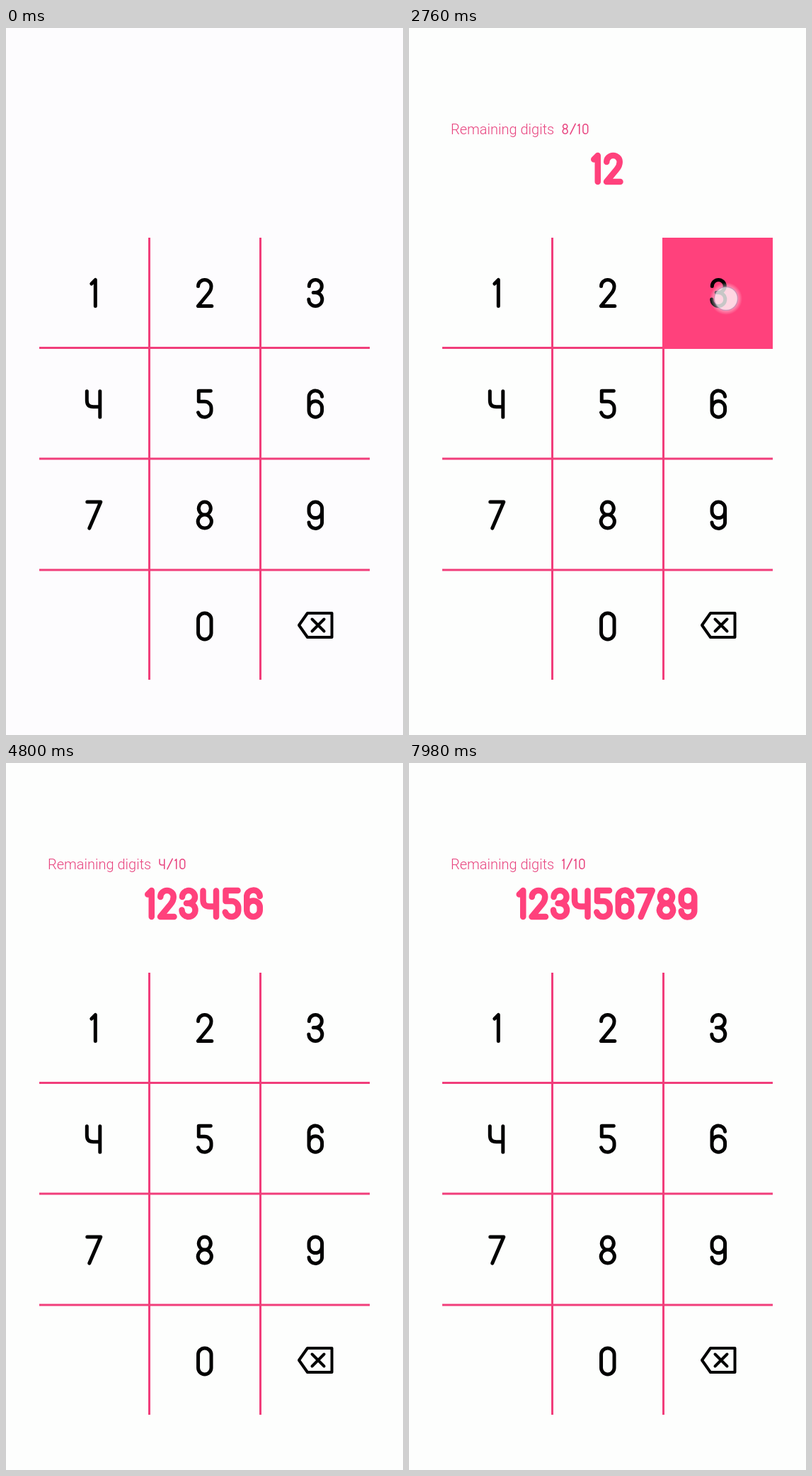
Write an HTML page that moves like this. It is 561x998 px and loops after 8000 ms.

```html
<!DOCTYPE html>
<html lang="en">
<head>
<meta charset="utf-8">
<title>Keypad</title>
<style>
  html, body { margin: 0; width: 100%; height: 100%; overflow: hidden; background: #fdfefd; }
  svg { display: block; width: 100vw; height: 100vh; }
  .glyph { fill: none; stroke-linecap: round; stroke-linejoin: round; }
  text { font: 300 20px Roboto, Lato, sans-serif; fill: #e8447f; }
</style>
</head>
<body>
<svg id="stage" viewBox="0 0 561 998">
  <defs>
    <radialGradient id="glow">
      <stop offset=".7" stop-color="#fff" stop-opacity=".45"/>
      <stop offset="1" stop-color="#fff" stop-opacity="0"/>
    </radialGradient>
  </defs>
  <rect id="back" width="561" height="998"/>
  <g id="label"><text x="59" y="150">Remaining digits</text><g id="count"></g></g>
  <g id="entry"></g>
  <path d="M202.5 296V920M359.5 296V920M47 451.5H514M47 608H514M47 765H514" stroke="#f13e7b" stroke-width="3"/>
  <rect id="cell" fill="#ff417c"/>
  <g id="keys"></g>
  <path class="glyph" d="M426 826H460.5V860H426L414 843ZM432.5 834.5L449.5 851.5M449.5 834.5L432.5 851.5" stroke="#000" stroke-width="4"/>
  <g id="touch">
    <circle r="23" fill="url(#glow)"/>
    <circle r="16.5" fill="#fff" fill-opacity=".6" stroke="#a878a8" stroke-opacity=".5" stroke-width="1.5"/>
  </g>
</svg>
<script>
const LOOP = 8000, STEP = 60, FADE = 180;
const $ = id => document.getElementById(id);

// Centre lines of the characters, around their middle
const GLYPHS = {
  0: 'M-9.25-9.25A9.25 9.25 0 0 1 9.25-9.25V9.25A9.25 9.25 0 0 1-9.25 9.25Z',
  1: 'M-3.5-13L2-18.5V18.5',
  2: 'M-9.25-9.5A9.25 9 0 0 1 9.25-9.5Q9.25-4 5 1L-9.5 18.5H10',
  3: 'M-9-9.5A9 9 0 1 1 0-.5H-3M0-.5A9.5 9.5 0 1 1-9.5 9',
  4: 'M-10-18V-5Q-10 4-1 4H8.5M8.5-18V18.5',
  5: 'M8.5-18.5H-8.5V-3.5H0A9.25 9.25 0 0 1 9.25 5.75V9.25A9.25 9.25 0 0 1 0 18.5Q-7 18.5-9.25 12',
  6: 'M9.25-10.5A9.25 9 0 0 0-9.25-9.25V9.25A9.25 9.25 0 0 0 9.25 9.25V5A9.25 9 0 0 0-9.25 5',
  7: 'M-9.5-18.5H9.5L-6.5 18.5',
  8: 'M0-.5A8.5 9 0 1 1 .01-.5ZM0-.5A9.5 9.5 0 1 0 .01-.5Z',
  9: 'M-9.25 10.5A9.25 9 0 0 0 9.25 9.25V-9.25A9.25 9.25 0 0 0-9.25-9.25V-5A9.25 9 0 0 0 9.25-5',
  '/': 'M-10 20L10-20'
};
const ADVANCE = { 1: 17, 7: 28, '/': 26 };
const advance = c => ADVANCE[c] || 30.5;

const glyph = (c, x, y, color, width, scale = 1) =>
  `<path class="glyph" d="${GLYPHS[c]}" transform="translate(${x} ${y}) scale(${scale})" stroke="${color}" stroke-width="${width}"/>`;

function line(text, x, y, color, width, scale = 1, gap = 0) {
  return [...text].map(c => {
    const w = advance(c) * scale + gap;
    x += w;
    return glyph(c, x - w / 2, y, color, width, scale);
  }).join('');
}

const COLS = [[47, 204], [201, 361], [358, 514]];
const ROWS = [[296, 453], [450, 609.5], [607, 766.5], [764, 920]];
const KEYS = '123456789 0<';

// key, finger down, touch gone, touch position
const PRESSES = [
  ['1', 1260, 1740, 133, 380],
  ['2', 2040, 2340, 299, 382],
  ['3', 2640, 3000, 448, 382],
  ['4', 3300, 3720, 133, 536],
  ['5', 3780, 4080, 285, 538],
  ['6', 4320, 4800, 446, 538],
  ['7', 5040, 5520, 131, 698],
  ['8', 5700, 6120, 291, 698],
  ['9', 6300, 6660, 446, 697],
  ['0', 7020, 7320, 285, 854],
  ['<', 7680, 7980, 455, 850]
].map(([key, down, end, x, y]) => ({ key, down, end, x, y, up: end - FADE }));

$('keys').innerHTML = [...KEYS].map((c, i) => GLYPHS[c]
  ? glyph(c, 124.3 + 156.5 * (i % 3), 374 + 156.8 * Math.floor(i / 3), '#000', 5)
  : '').join('');

function set(el, attrs) {
  for (const name in attrs) el.setAttribute(name, attrs[name]);
}

function showCell(key) {
  const i = KEYS.indexOf(key);
  const [x1, x2] = COLS[i % 3], [y1, y2] = ROWS[Math.floor(i / 3)];
  set($('cell'), { x: x1, y: y1, width: x2 - x1, height: y2 - y1 });
}

let shown = null;
function showEntry(digits) {
  if (digits === shown) return;
  shown = digits;
  const width = [...digits].reduce((sum, c) => sum + advance(c), 0);
  $('entry').innerHTML = line(digits, 280 - width / 2, 198.5, '#ff417c', 8.5);
  $('count').innerHTML = line(`${10 - digits.length}/10`, 214.8, 142.5, '#e8447f', 4.2, .365, .6);
  $('label').setAttribute('visibility', digits ? 'visible' : 'hidden');
}

function render(time) {
  const t = Math.floor(time % LOOP / STEP) * STEP;
  const digits = PRESSES.filter(p => t >= p.up)
    .reduce((s, p) => p.key === '<' ? s.slice(0, -1) : s + p.key, '');
  const press = PRESSES.find(p => t >= p.down && t < p.end);
  const held = press && t < press.up;

  showEntry(digits);
  set($('back'), { fill: t < PRESSES[0].down ? '#fdfcfe' : '#fdfefd' });
  set($('cell'), { visibility: held ? 'visible' : 'hidden' });
  set($('touch'), { opacity: press ? Math.min(1, (press.end - t) / FADE) : 0 });
  if (press) {
    showCell(press.key);
    set($('touch'), { transform: `translate(${press.x} ${press.y})` });
  }
}

const start = performance.now();
function tick() {
  render(performance.now() - start);
  requestAnimationFrame(tick);
}
tick();
</script>
</body>
</html>
```
